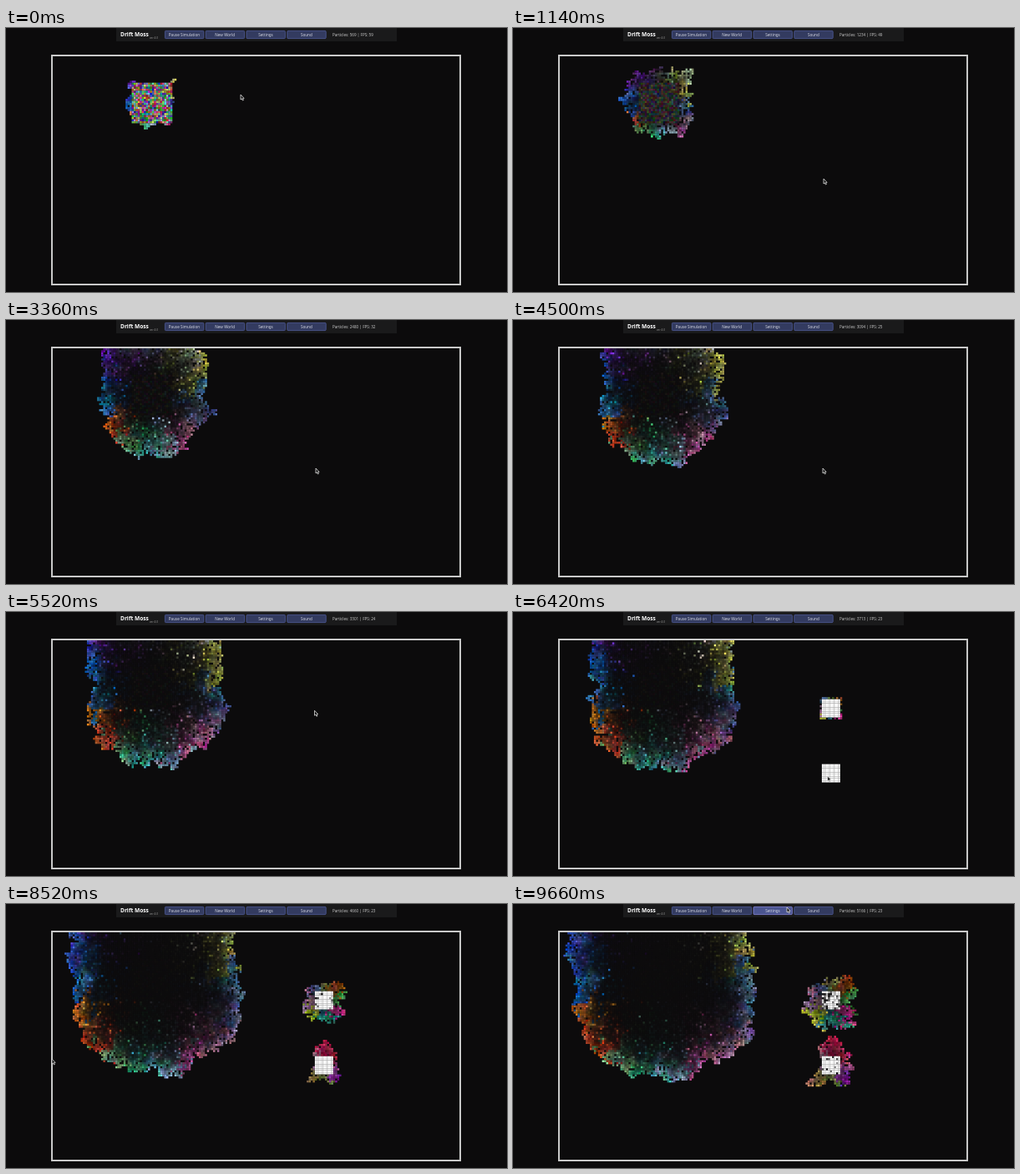
These frames come from a looping animation (600 px wide and 317 px high, 9720 ms). An HTML page with a canvas:

```html
<!DOCTYPE html>
<html lang="en">
<head>
<meta charset="utf-8">
<title>Particle world</title>
<style>
  html, body { margin: 0; width: 100%; height: 100%; overflow: hidden; background: #0c0b0c; }
  canvas { display: block; width: 600px; height: 317px; }
</style>
</head>
<body>
<canvas id="stage" width="600" height="317"></canvas>
<script>
const ctx = document.getElementById('stage').getContext('2d');
const LOOP = 9720, STEP = 60;
const CELL = 2.437, GRID_X = 55.5, GRID_Y = 34, COLS = 200, ROWS = 112;
const FONT = '"Noto Sans", sans-serif';

// Radii run clockwise from east; each row is the reach at the matching time.
const colonies = [
  {
    col: 39, row: 13, size: 20, start: 0,
    times: [0, 2280, 5520, 9660],
    reach: [
      [50, 70, 56, 58, 66, 60, 64, 65, 62, 62, 54, 54, 56, 60, 64, 68, 70, 62, 60, 62, 68, 74, 67, 60],
      [82, 98, 98, 98, 90, 104, 92, 102, 92, 94, 84, 84, 70, 81, 86, 101, 92, 90, 90, 90, 92, 95, 97, 84],
      [116, 118, 130, 128, 118, 132, 113, 120, 118, 124, 110, 104, 96, 114, 122, 130, 130, 120, 110, 120, 130, 130, 122, 116]
    ],
    palette: ['3f80a8', '5a72b0', '7a68a0', 'c080a8', 'd858a8', '90b4dc', '50d0c8', '40c890',
      '78c080', 'e84c20', 'f08028', '2878d8', '2090c8', '2060e0', '3048d0', '7030d0',
      '602890', '504080', '404068', '606058', '809048', 'c8d0b0', 'd8dc60', 'a8b858']
  },
  {
    col: 129, row: 29, size: 9, start: 5700, decay: 2400,
    times: [5700, 9660],
    reach: [[24, 40, 34, 38, 30, 30, 28, 42]],
    palette: ['40a050', 'd83098', '28907c', 'b8d030', 'b880b0', '6078a0', '707840', 'b05820']
  },
  {
    col: 129, row: 61, size: 9, start: 6240, decay: 3100,
    times: [6240, 9660],
    reach: [[24, 34, 22, 36, 16, 18, 37, 24]],
    palette: ['d050a0', '9828c0', '809048', 'b08050', 'd080b0', 'c06880', 'd01848', 'c83050']
  }
];

const stats = [
  [0, 569, 59], [2280, 1899, 38], [4500, 3094, 25], [5520, 3301, 24],
  [7260, 4098, 23], [8520, 4660, 23], [9660, 5166, 23], [9720, 5190, 23]
];

const cursorPath = [
  [0, 281, 80], [240, 281, 80], [960, 373, 184], [1320, 371, 178], [5100, 371, 178],
  [5460, 366, 119], [5700, 380, 116], [5960, 380, 116], [6200, 380, 194], [6400, 380, 194],
  [6700, 330, 238], [7140, 30, 200], [7260, 38, 193], [7900, 50, 211], [8520, 55, 186],
  [8700, 55, 186], [9180, 328, 4], [9720, 328, 4]
];

const lerp = (a, b, u) => a + (b - a) * u;
const fract = v => v - Math.floor(v);
const hash = (x, y, salt = 0) => fract(Math.sin(x * 127.1 + y * 311.7 + salt * 74.7) * 43758.5453);
const smooth = u => u * u * (3 - 2 * u);

function noise(x, y, salt) {
  const ix = Math.floor(x), iy = Math.floor(y), u = smooth(x - ix), v = smooth(y - iy);
  return lerp(
    lerp(hash(ix, iy, salt), hash(ix + 1, iy, salt), u),
    lerp(hash(ix, iy + 1, salt), hash(ix + 1, iy + 1, salt), u), v);
}

function ringValue(list, turn) {
  const p = turn * list.length, i = Math.floor(p);
  return lerp(list[i % list.length], list[(i + 1) % list.length], p - i);
}

function sample(keys, t) {
  let i = 1;
  while (i < keys.length - 1 && keys[i][0] < t) i++;
  const a = keys[i - 1], b = keys[i], u = (t - a[0]) / (b[0] - a[0]);
  return a.map((v, k) => lerp(v, b[k], u));
}

function founderColor(x, y, colony) {
  if (colony.decay) return '#fff';
  return `hsl(${hash(x, y, 1) * 360}, ${50 + 45 * hash(x, y, 2)}%, ${35 + 40 * hash(x, y, 3)}%)`;
}

function growthColor(x, y, turn, palette) {
  const n = palette.length;
  const shift = (noise(x / 4, y / 4, 4) - 0.5) * n / 12 + (hash(x, y, 5) - 0.5) * 0.7;
  const rgb = parseInt(palette[(Math.round(turn * n + shift) + n) % n], 16);
  const tint = (noise(x / 3, y / 3, 6) - 0.4) * 60 + (hash(x, y, 7) - 0.5) * 55;
  const channels = [rgb >> 16, rgb >> 8 & 255, rgb & 255]
    .map((c, i) => Math.round(c + tint + (noise(x / 3, y / 3, 8 + i) - 0.5) * 70));
  return `rgb(${channels.join()})`;
}

const rowsOfReach = (colony, turn) => colony.reach.map(list => ringValue(list, turn));

function grow(colony, index) {
  const { col, row, size, start, times } = colony;
  const mid = size / 2, born = new Map(), key = (x, y) => y * COLS + x;
  const cells = [], sites = [];
  const add = (x, y, turn, birth, founder) => {
    born.set(key(x, y), birth);
    cells.push({
      x: GRID_X + x * CELL, y: GRID_Y + y * CELL, birth, founder, colony,
      tone: hash(x, y, 11), rest: hash(x, y, 12),
      color: founder ? founderColor(x, y, colony) : growthColor(x, y, turn, colony.palette)
    });
  };

  for (let y = 0; y < ROWS; y++) for (let x = 0; x < COLS; x++) {
    const dx = x + 0.5 - col - mid, dy = y + 0.5 - row - mid;
    const r = Math.hypot(dx, dy) * CELL;
    if (r > 150) continue;
    const turn = fract(Math.atan2(dy, dx) / (2 * Math.PI) + 1);
    if (Math.max(Math.abs(dx), Math.abs(dy)) < mid) {
      add(x, y, turn, start, true);
      continue;
    }
    const edge = mid * CELL * r / (CELL * Math.max(Math.abs(dx), Math.abs(dy)));
    const rough = noise(x / 3.5, y / 3.5, 20 + index);
    const first = index ? edge - 1 : edge + rough * 20 - 9;
    const reach = [first, ...rowsOfReach(colony, turn).map(v => v - 7 + rough * 13)];
    sites.push({ x, y, r, turn, reach });
  }

  const settle = index ? 0 : 24;
  for (let step = -settle; start + step * STEP < LOOP; step++) {
    const t = Math.max(start, start + step * STEP);
    let seg = 0;
    while (seg < times.length - 2 && times[seg + 1] < t) seg++;
    const u = (t - times[seg]) / (times[seg + 1] - times[seg]);
    const fresh = [];
    for (const s of sites) {
      if (s.done || s.r > lerp(s.reach[seg], s.reach[seg + 1], u)) continue;
      let near = 0, beside = 0;
      for (let j = -1; j < 2; j++) for (let i = -1; i < 2; i++) {
        const nx = s.x + i, ny = s.y + j;
        if ((i || j) && nx >= 0 && nx < COLS && born.has(key(nx, ny))) {
          near++;
          if (!i || !j) beside++;
        }
      }
      if (beside && hash(s.x, s.y, step + 50) < (near < 4 ? 0.45 : 0.05)) fresh.push(s);
    }
    for (const s of fresh) {
      s.done = true;
      add(s.x, s.y, s.turn, t, false);
    }
  }
  return cells;
}

const cells = colonies.flatMap(grow);

function brightness(cell, t) {
  const age = t - cell.birth, { decay } = cell.colony;
  if (cell.founder && decay) {
    return age < decay + cell.tone * 2300 ? 1 : cell.rest * 0.85;
  }
  const tau = decay ? 4000 : 800 + cell.birth * 0.17;
  const glow = (0.6 + 0.4 * cell.tone) * Math.exp(-age / tau);
  return Math.min(1, glow + 0.2 * cell.rest * cell.rest * Math.exp(-age / 3500));
}

function drawCells(t) {
  for (const cell of cells) {
    if (cell.birth > t) continue;
    ctx.globalAlpha = brightness(cell, t);
    ctx.fillStyle = cell.color;
    ctx.fillRect(cell.x, cell.y, CELL, CELL);
  }
  ctx.globalAlpha = 1;
}

function text(str, x, y, size, color, align = 'left', weight = 400) {
  ctx.font = `${weight} ${size}px ${FONT}`;
  ctx.textAlign = align;
  ctx.fillStyle = color;
  ctx.fillText(str, x, y);
}

function drawToolbar(t) {
  ctx.fillStyle = '#1a1a1b';
  ctx.fillRect(132, 0, 336, 16);
  text('Drift Moss', 137, 10.3, 6.6, '#fff', 'left', 700);
  text('ver 4.0', 172, 12.8, 3.2, '#999');
  ['Pause Simulation', 'New World', 'Settings', 'Sound'].forEach((label, i) => {
    const x = 190 + i * 48.8, hover = i === 2 && t >= 9120;
    ctx.beginPath();
    ctx.roundRect(x + 0.4, 3.4, 46.4, 9.2, 1);
    ctx.fillStyle = hover ? '#4b5590' : '#333b60';
    ctx.fill();
    ctx.lineWidth = 0.8;
    ctx.strokeStyle = hover ? '#8a8ae0' : '#505c9c';
    ctx.stroke();
    text(label, x + 23.4, 9.7, 4.6, '#d4d6e0', 'center');
  });
  const [, count, fps] = sample(stats, t).map(Math.round);
  text(`Particles: ${count} | FPS: ${fps}`, 391, 9.7, 4.6, '#c4c4c4');
}

function drawCursor(t) {
  const [, x, y] = sample(cursorPath, t);
  const outline = [[0, 0], [0, 6], [1.4, 4.9], [2.4, 7], [3.4, 6.6], [2.5, 4.6], [4.1, 4.4]];
  ctx.beginPath();
  outline.forEach(([px, py]) => ctx.lineTo(x + px, y + py));
  ctx.closePath();
  ctx.fillStyle = '#111';
  ctx.fill();
  ctx.lineWidth = 0.8;
  ctx.strokeStyle = '#ddd';
  ctx.stroke();
}

function draw() {
  const t = Math.floor(performance.now() % LOOP / STEP) * STEP;
  ctx.fillStyle = '#0c0b0c';
  ctx.fillRect(0, 0, 600, 317);
  drawCells(t);
  ctx.lineWidth = 2;
  ctx.strokeStyle = '#c9c9c9';
  ctx.strokeRect(55, 33, 489, 275);
  drawToolbar(t);
  drawCursor(t);
  requestAnimationFrame(draw);
}

draw();
</script>
</body>
</html>
```
